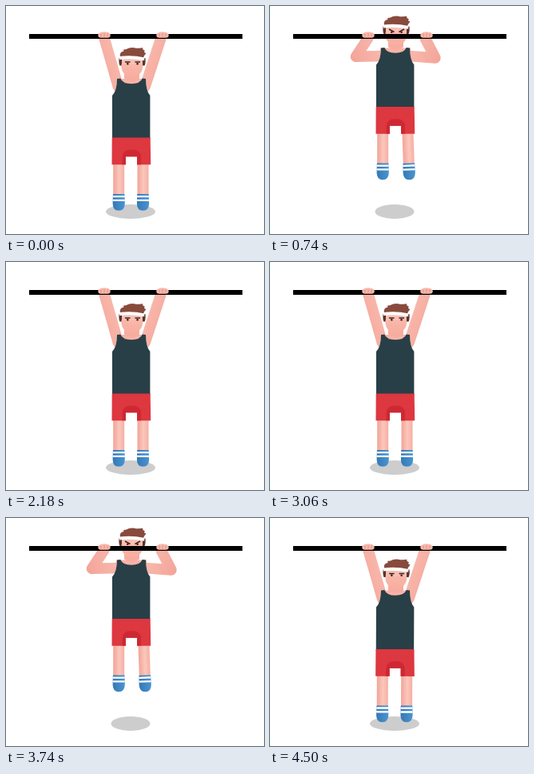
An HTML page that plays this animation: 323x285 px, repeating every 4.54 s.

```html
<!DOCTYPE html>
<html lang="en">
<head>
<meta charset="utf-8">
<title>Pull-ups</title>
<style>
  html, body { margin: 0; width: 100%; height: 100%; overflow: hidden; background: #fff; }
  svg { display: block; width: 100vw; height: 100vh; }
  .arm { fill: none; stroke-width: 13.6; stroke-linejoin: round; stroke-linecap: round; }
</style>
</head>
<body>
<svg viewBox="0 0 323 285">
  <defs>
    <linearGradient id="armL" gradientUnits="userSpaceOnUse" x1="102" y1="70" x2="136" y2="58">
      <stop offset="0" stop-color="#f4a499"/><stop offset="1" stop-color="#f8b6aa"/>
    </linearGradient>
    <linearGradient id="armR" gradientUnits="userSpaceOnUse" x1="213" y1="70" x2="180" y2="58">
      <stop offset="0" stop-color="#f4a499"/><stop offset="1" stop-color="#f8b6aa"/>
    </linearGradient>
    <linearGradient id="leg">
      <stop offset="0" stop-color="#f3a398"/><stop offset=".55" stop-color="#fbc8bc"/><stop offset="1" stop-color="#f6aea3"/>
    </linearGradient>
    <linearGradient id="face" x2="0" y2="1">
      <stop offset="0" stop-color="#fabfb1"/><stop offset="1" stop-color="#f8ada0"/>
    </linearGradient>
    <linearGradient id="shoe">
      <stop offset="0" stop-color="#3579b5"/><stop offset="1" stop-color="#4a94d0"/>
    </linearGradient>
    <g id="limb">
      <rect x="-7" y="-6" width="14" height="44" fill="url(#leg)"/>
      <path d="M-7.3 37.500H7.300L7.600 49.500Q7.300 58.300 0 58.300Q-7.400 58.300 -7.600 49.500Z" fill="url(#shoe)"/>
      <path d="M-7.400 40.600H7.400M-7.500 45.400H7.500" stroke="#fff" stroke-width="2.4"/>
    </g>
    <g id="fist">
      <path d="M-7.500 38Q-8.500 34 -5 33.400Q-3.500 32 -1.500 32.600Q1 31.800 3 32.800Q5.500 32.500 6.500 34.300Q8.300 35 7.500 38Q6.500 40 4 39.700H-4.500Q-7 39.700 -7.500 38Z" fill="#f8b8ac"/>
      <path d="M-4 34.500V38.500M0 34V38.500M4 34.500V38.500" stroke="#dc8a82" stroke-width=".9"/>
    </g>
  </defs>

  <ellipse id="shadow" cx="156" cy="257" rx="31" ry="9" fill="#cdcdcd"/>
  <path id="left" class="arm" stroke="url(#armL)"/>
  <path id="right" class="arm" stroke="url(#armR)"/>

  <g id="body">
    <g id="legL"><use href="#limb"/></g>
    <g id="legR"><use href="#limb"/></g>
    <path d="M138 91H176L178 112H136Z" fill="#f8b3a7"/>
    <path d="M139 91L143.300 90.500Q146 97.300 157 97.300Q168 97.300 170.700 90.500L175 91Q175 106 180.400 112V166H133V112Q139 106 139 91Z" fill="#283f47"/>
    <path d="M132.700 164.500H180.700L181.200 198.300H164V188.300H150V198.300H132.500Z" fill="#dd3740"/>
    <path d="M145.500 198.300V189Q146 179.500 157 179.500Q168.500 179.500 169 189V198.300H164V188.300H150V198.300Z" fill="#cd2833"/>
    <g id="head">
      <path d="M148 80H167V91Q157 97 148 91Z" fill="#f7aca0"/>
      <path d="M141.500 65H146V74.500H142.500Q141 72 141.500 65ZM170 65H174.500Q175 72 173.500 74.500H170Z" fill="#59322d"/>
      <ellipse cx="157.800" cy="75.500" rx="13.400" ry="13.300" fill="url(#face)"/>
      <path d="M145 64H171V73H145Z" fill="#fabfb1"/>
      <path d="M143 64Q141.500 57 147.500 56.500Q146 53.500 150 54.300Q156 51 163 52.700Q168 53 171.500 52.300Q170 54.700 174 55.700Q171.500 58 175.500 59Q172 62.500 172 65.500Q158 61 143 64Z" fill="#884a3c"/>
      <path d="M142 63Q158 60.800 173.500 64.500L173 68.300Q158 65 142 67Z" fill="#fff"/>
      <g fill="#3a2424">
        <circle cx="152.300" cy="72.200" r="1.300"/><circle cx="164.600" cy="72.200" r="1.300"/>
      </g>
      <path id="brows" fill="none" stroke="#3a2424" stroke-width="1.500"/>
    </g>
  </g>

  <rect x="29" y="35" width="267" height="6" fill="#000"/>
  <use href="#fist" x="123"/>
  <use href="#fist" x="196"/>
</svg>
<script>
const LOOP = 4540, REP = 3000, STEP = 40, TOP = 38.5;
// time, lift, sway in degrees
const KEYS = [
  [60, 0, 0], [180, 1.5, 0], [260, 6, 0], [340, 16, 0], [420, 27, 0], [500, 34.5, 0],
  [580, 37.5, 0], [660, TOP, 0], [1000, TOP, 0], [1060, 37.5, -.2], [1100, 35, -.4],
  [1140, 31, -.6], [1180, 23, -.9], [1220, 16, -1.1], [1260, 10, -1.2], [1300, 6, -1.2],
  [1380, 3, -.7], [1500, .5, .2], [1740, 0, 0]
];
const $ = id => document.getElementById(id);
const set = (id, name, value) => $(id).setAttribute(name, value);

function pose(t) {
  if (t <= KEYS[0][0]) return [0, 0];
  const i = KEYS.findIndex(k => k[0] > t);
  if (i < 0) return [0, 0];
  const a = KEYS[i - 1], b = KEYS[i], f = (t - a[0]) / (b[0] - a[0]);
  return [1, 2].map(n => a[n] + (b[n] - a[n]) * f);
}

// Two-bone arm; side is -1 for left, 1 for right
function arm(id, hx, sx, sy, side) {
  const hy = 40, fore = 28, upper = 33;
  const dx = sx - hx, dy = sy - hy, d = Math.hypot(dx, dy);
  const reach = Math.min(d / 2 + (fore * fore - upper * upper) / (2 * d), fore);
  const bend = d < fore + upper ? Math.sqrt(Math.max(0, fore * fore - reach * reach)) : 0;
  const ex = hx + (dx * reach + side * dy * bend) / d;
  const ey = hy + (dy * reach - side * dx * bend) / d;
  set(id, 'd', `M${hx} ${hy}L${ex} ${ey}L${sx} ${sy}`);
}

function draw(ms) {
  const t = ms % LOOP % REP;
  const [lift, sway] = pose(20 + STEP * Math.floor((t - 20) / STEP));
  const k = lift / TOP;
  set('body', 'transform', `translate(0 ${-lift}) rotate(${sway} 157 95)`);
  set('legL', 'transform', 'translate(141.200 197.500)');
  set('legR', 'transform', `translate(${171.5 + k} 197.500) rotate(${-2 * k})`);
  set('head', 'transform', `translate(0 ${-k})`);
  const out = 70 - 1.5 * k, inn = 70 + 2 * k;
  set('brows', 'd', `M149 ${out}L155.500 ${inn}M168 ${out}L161.500 ${inn}`);
  set('shadow', 'rx', 31 - 6.5 * k * k);
  arm('left', 123, 140.5, 101 - lift, -1);
  arm('right', 194, 174, 101 - lift, 1);
}

const start = performance.now();
(function tick() {
  draw(performance.now() - start);
  requestAnimationFrame(tick);
})();
</script>
</body>
</html>
```
